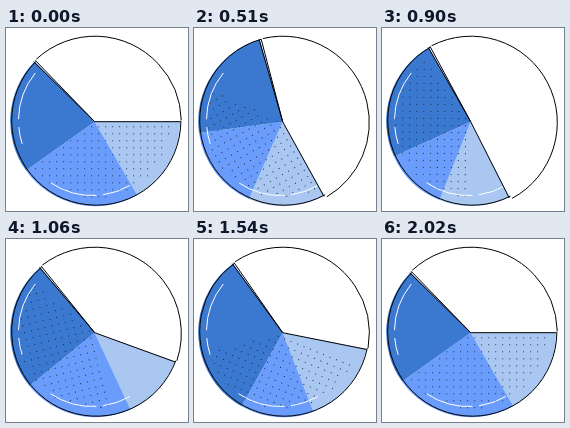
These frames come from a looping animation (182x183 px, 2.08 s). An HTML page with a canvas:

```html
<!DOCTYPE html>
<html lang="en">
<head>
<meta charset="utf-8">
<title>Shifting pie chart</title>
<style>
  html, body { margin: 0; width: 100%; height: 100%; overflow: hidden; background: #fff; }
  canvas { display: block; width: 182px; height: 183px; }
</style>
</head>
<body>
<canvas id="pie" width="182" height="183"></canvas>
<script>
const LOOP = 2080;
const HUB = [88.7, 93.7];
const COLORS = ['#a9c7f0', '#6a9cfc', '#3b78d0'];
const ctx = document.getElementById('pie').getContext('2d');
const rad = deg => deg * Math.PI / 180;

// Slice borders clockwise from the light slice, then the turn of the dot texture
const REST = [0, 60.4, 144.5, 224.5, 0];
const OPEN = [56.7, 109.7, 173, 255, 55];
const KEYS = [
  { at: 100, pose: REST },
  { at: 280, pose: OPEN },
  { at: 430, pose: OPEN },
  { at: 780, pose: [91.3, 142, 165, 247, 100] },
  { at: 1060, pose: [20, 65.5, 140.7, 229.8, 76] },
  { at: 1340, pose: [55.6, 105, 151.5, 274, 58] },
  { at: 1540, pose: [11.3, 69.2, 119.4, 233.8, 22] },
  { at: 1810, pose: REST }
];

const ease = u => (1 - Math.cos(Math.PI * u)) / 2;

function poseAt(t) {
  const next = KEYS.findIndex(key => key.at > t);
  if (next < 1) return REST;
  const a = KEYS[next - 1], b = KEYS[next];
  const k = ease((t - a.at) / (b.at - a.at));
  return a.pose.map((v, i) => v + (b.pose[i] - v) * k);
}

function sector(from, to) {
  ctx.beginPath();
  ctx.moveTo(...HUB);
  ctx.arc(89.2, 93.2, 85, rad(from), rad(to));
  ctx.closePath();
}

function strokeArc(x, y, r, from, to, color) {
  ctx.beginPath();
  ctx.arc(x, y, r, rad(from), rad(to));
  ctx.strokeStyle = color;
  ctx.lineWidth = 1;
  ctx.stroke();
}

function drawEdge(angle) {
  const a = rad(angle);
  ctx.beginPath();
  ctx.moveTo(...HUB);
  ctx.lineTo(HUB[0] + 85.5 * Math.cos(a), HUB[1] + 85.5 * Math.sin(a));
  ctx.strokeStyle = '#000';
  ctx.lineWidth = 1;
  ctx.stroke();
}

function drawDots(start, end, turn) {
  ctx.save();
  sector(start, end);
  ctx.clip();
  ctx.translate(...HUB);
  ctx.rotate(rad(turn));
  ctx.fillStyle = '#10203c';
  for (let y = 5; y < 76; y += 7) {
    for (let x = -73; x < 76; x += 7) {
      if (Math.hypot(x, y) > 76 || Math.atan2(y, x) > rad(143)) continue;
      ctx.beginPath();
      ctx.arc(x, y, 0.55, 0, 7);
      ctx.fill();
    }
  }
  ctx.restore();
}

function drawHighlights() {
  strokeArc(88, 92.5, 75.5, 162, 175, '#fff');
  strokeArc(88, 92.5, 75.5, 181, 219, '#fff');
  strokeArc(86.5, 92.5, 75, 60, 82, '#fff');
  strokeArc(86.5, 92.5, 75, 87, 124, '#fff');
}

function draw(t) {
  const [start, mid, dark, end, turn] = poseAt(t);
  const borders = [start, mid, dark, end];
  ctx.fillStyle = '#fff';
  ctx.fillRect(0, 0, 182, 183);

  // rim of the empty slice
  strokeArc(89, 94.5, 86.3, end + 2.6, start + 358.4, '#000');

  COLORS.forEach((color, i) => {
    sector(borders[i], borders[i + 1]);
    ctx.fillStyle = color;
    ctx.fill();
  });
  drawDots(start, end, turn);
  drawHighlights();

  strokeArc(90.3, 92.6, 84.6, start, end, '#000');
  [start, end, end + 1.4].forEach(drawEdge);
}

function tick() {
  draw(performance.now() % LOOP);
  requestAnimationFrame(tick);
}
tick();
</script>
</body>
</html>
```
